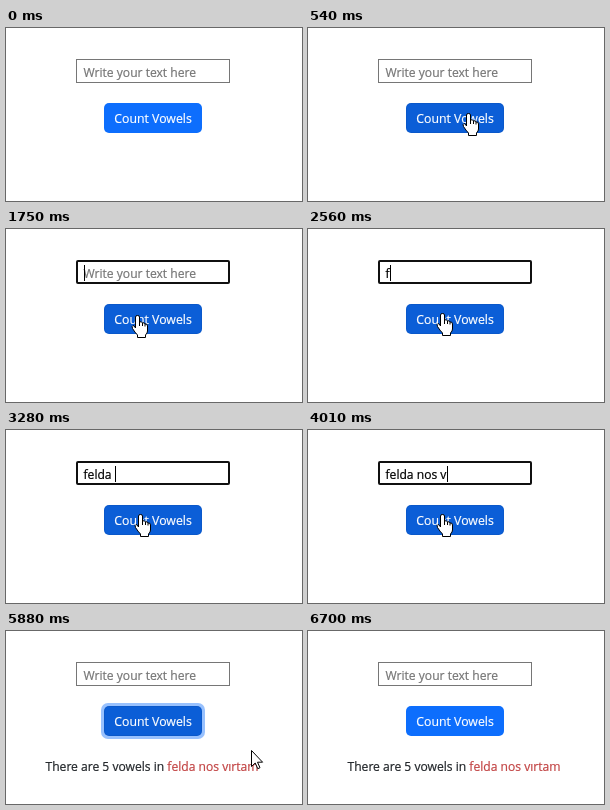
Recreate the animation shown at these times as an HTML page with a canvas. Size 296 by 173 pixels, loop 6.83 s.

```html
<!DOCTYPE html>
<html lang="en">
<head>
<meta charset="utf-8">
<title>Count Vowels</title>
<style>
  html, body { margin: 0; width: 100%; height: 100%; overflow: hidden; background: #fff; }
  canvas { display: block; width: 296px; height: 173px; }
</style>
</head>
<body>
<canvas></canvas>
<script>
const W = 296, H = 173, LOOP = 6830, TICK = 66.7;
const FAMILY = '"Open Sans", "Noto Sans", sans-serif';
const NAME = 'felda nos vırtam';
const VOWELS = NAME.match(/[aeıioöuü]/g).length;

const INPUT = { x: 70, y: 31, w: 154, h: 24 };
const BUTTON = { x: 98, y: 75, w: 98, h: 30 };

const FOCUS = 22, CARET_OFF = 30, TYPE = 38, KEY_PACE = 2.2;
const PRESS = 80, RELEASE = 82, BLUR = 100;

// Pointer moves; easeX and easeY are ease-out powers (1 is linear).
const ENTRY = { x: 239, y: 176 };
const MOVES = [
  { from: 0, to: 8, x: 160, y: 85 },
  { from: 11, to: 12, x: 157, y: 82 },
  { from: 16, to: 19, x: 105, y: 37 },
  { from: 23, to: 26, x: 131, y: 86 },
  { from: 29, to: 32, x: 134, y: 84 },
  { from: 85, to: 95, x: 274, y: 176, easeX: 4.4, easeY: 1.34 }
];

const ARROW = new Path2D('M.5 .5V16.5L4.2 13L6.8 18.7L9 17.7L6.5 12.2H11.6Z');
const HAND = new Path2D('M-1.5 13V2Q-1.5 .5 .5 .5Q2.5 .5 2.5 2V7Q4.5 6 5.5 8' +
  'Q7.5 7 8 9Q10.5 8.5 10.5 11V16Q10.5 18 8.5 20V22.5H.5V20Q-2 17.5 -4.5 13.5' +
  'Q-5.5 11 -4 10.5Q-2.8 10.5 -1.5 13Z');
const KNUCKLES = new Path2D('M2.5 7V11M5.5 8V11M8 9V11.5');
const IBEAM = new Path2D('M-3 -7.5H0M1 -7.5H4M.5 -7V7M-3 7.5H0M1 7.5H4');

const canvas = document.querySelector('canvas');
const ctx = canvas.getContext('2d');
const ratio = window.devicePixelRatio || 1;
canvas.width = W * ratio;
canvas.height = H * ratio;

const within = (v, from, to) => v >= from && v < to;
const inside = (p, r) => within(p.x, r.x, r.x + r.w) && within(p.y, r.y, r.y + r.h);
const easeOut = (k, power = 1) => 1 - (1 - k) ** power;

function pointerAt(tick) {
  let { x, y } = ENTRY;
  for (const move of MOVES) {
    const k = Math.min(1, Math.max(0, (tick - move.from) / (move.to - move.from)));
    x += (move.x - x) * easeOut(k, move.easeX);
    y += (move.y - y) * easeOut(k, move.easeY);
  }
  return { x: Math.round(x), y: Math.round(y) };
}

function typedAt(tick) {
  if (tick >= RELEASE) return '';
  return [...NAME].filter((_, i) => tick >= Math.round(TYPE + i * KEY_PACE)).join('');
}

function text(str, x, y, color, size = 12.1, align = 'left') {
  ctx.font = `${size}px ${FAMILY}`;
  ctx.textAlign = align;
  ctx.fillStyle = ctx.strokeStyle = color;
  ctx.lineWidth = 0.2;
  ctx.fillText(str, x, y);
  ctx.strokeText(str, x, y);
  return ctx.measureText(str).width;
}

function box(r, grow, radius, color) {
  ctx.fillStyle = color;
  ctx.beginPath();
  ctx.roundRect(r.x - grow, r.y - grow, r.w + 2 * grow, r.h + 2 * grow, radius);
  ctx.fill();
}

function drawInput(tick, hover) {
  const focused = within(tick, FOCUS, PRESS);
  box(INPUT, 0, focused ? 2 : 0, focused ? '#101010' : hover ? '#444' : '#767676');
  box(INPUT, focused ? -2 : -1, 0, '#fff');

  const typed = typedAt(tick);
  const width = typed ? text(typed, 77.5, 49, '#000') : 0;
  if (!typed) text('Write your text here', 77.5, 49, '#757575');
  if (focused && !within(tick, CARET_OFF, TYPE)) {
    ctx.fillStyle = '#000';
    ctx.fillRect(Math.round(78 + width), 36, 1, 16);
  }
}

function drawButton(tick, hover) {
  const focused = within(tick, PRESS, BLUR);
  const pressed = within(tick, PRESS, RELEASE);
  const [border, fill] = pressed ? ['#0a53be', '#0a58ca']
    : hover || focused ? ['#0a58ca', '#0b5ed7'] : ['#0d6efd', '#0d6efd'];
  if (focused) box(BUTTON, 3, 7, '#98c1fe');
  box(BUTTON, 0, 5, border);
  box(BUTTON, -1, 4, fill);
  text('Count Vowels', 147, 95, '#fff', 12.3, 'center');
}

function drawClick(p) {
  ctx.fillStyle = 'rgba(225, 215, 40, 0.6)';
  ctx.beginPath();
  ctx.arc(p.x - 0.5, p.y, 12, 0, Math.PI * 2);
  ctx.fill();
}

function drawPointer(p, overInput, overButton) {
  ctx.save();
  ctx.translate(p.x, p.y);
  ctx.lineWidth = 1;
  ctx.strokeStyle = '#000';
  ctx.fillStyle = '#fff';
  if (overInput) {
    ctx.stroke(IBEAM);
  } else {
    const shape = overButton ? HAND : ARROW;
    ctx.fill(shape);
    ctx.stroke(shape);
    if (overButton) ctx.stroke(KNUCKLES);
  }
  ctx.restore();
}

function draw(time) {
  const tick = Math.floor((time % LOOP) / TICK);
  const p = pointerAt(tick);
  const overInput = inside(p, INPUT), overButton = inside(p, BUTTON);

  ctx.setTransform(ratio, 0, 0, ratio, 0, 0);
  ctx.fillStyle = '#fff';
  ctx.fillRect(0, 0, W, H);
  drawInput(tick, overInput);
  drawButton(tick, overButton);

  if (tick >= RELEASE) {
    const width = text(`There are ${VOWELS} vowels in `, 39.5, 140, '#212529');
    text(NAME, 39.5 + width, 140, '#c24444');
  }
  if (tick === FOCUS || within(tick, PRESS, RELEASE)) drawClick(p);
  drawPointer(p, overInput, overButton);
}

const start = performance.now();
function loop() {
  draw(performance.now() - start);
  requestAnimationFrame(loop);
}
loop();
</script>
</body>
</html>
```
